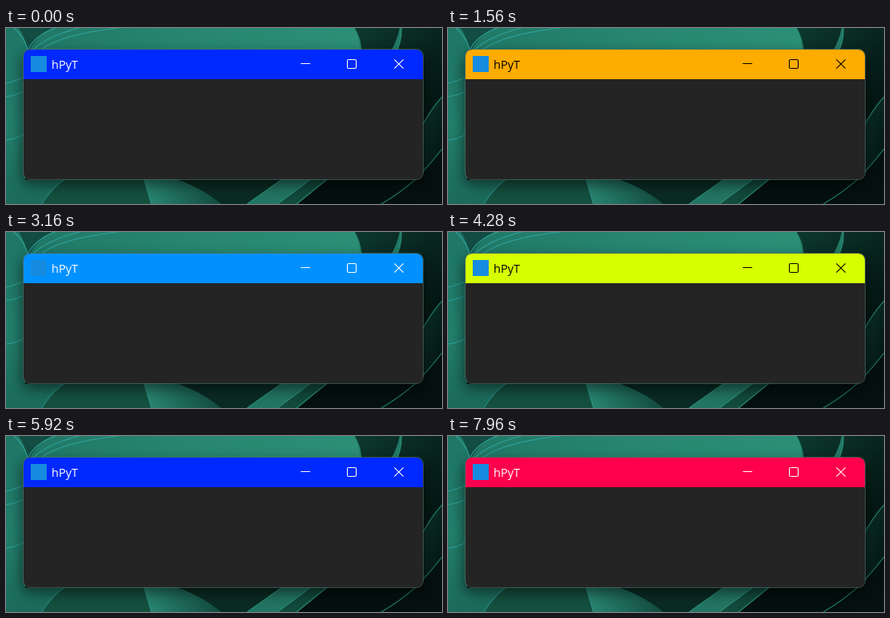
Write an HTML page that moves like this. It is 546 by 220 pixels and loops after 8000 ms.

```html
<!DOCTYPE html>
<html lang="en">
<head>
<meta charset="utf-8">
<title>Rainbow title bar</title>
<style>
  html, body { margin: 0; width: 100%; height: 100%; overflow: hidden; background: #04110f; }
  svg { display: block; width: 546px; height: 220px; }
  text { font: 14.6px "Open Sans", "Noto Sans", sans-serif; }
</style>
</head>
<body>
<svg viewBox="0 0 546 220">
  <defs>
    <linearGradient id="leaf" x2="1" y2="0">
      <stop offset="0" stop-color="#1f7666"/>
      <stop offset=".5" stop-color="#27866f"/>
      <stop offset="1" stop-color="#2b8f76"/>
    </linearGradient>
    <linearGradient id="side" x2="0" y2="1">
      <stop offset="0" stop-color="#1f7868"/>
      <stop offset=".5" stop-color="#23806d"/>
      <stop offset="1" stop-color="#1b6a5a"/>
    </linearGradient>
    <linearGradient id="night" x2="1" y2="1">
      <stop offset="0" stop-color="#0d3a2f"/>
      <stop offset="1" stop-color="#03100d"/>
    </linearGradient>
    <linearGradient id="petal" x2="1" y2="0">
      <stop offset="0" stop-color="#2a8974"/>
      <stop offset="1" stop-color="#12493d"/>
    </linearGradient>
    <filter id="blur" x="-20%" y="-30%" width="140%" height="160%">
      <feGaussianBlur stdDeviation="9"/>
    </filter>
    <clipPath id="frame"><rect x="22" y="27" width="500" height="162" rx="8"/></clipPath>
  </defs>

  <!-- wallpaper: top and right -->
  <rect width="546" height="220" fill="#04110f"/>
  <path d="M430 0H546V90L518 130V40H430Z" fill="url(#night)"/>
  <path d="M0 0H436Q444 12 445 40H0Z" fill="url(#leaf)"/>
  <path d="M16 0H58Q38 10 28 30Q24 12 16 0Z" fill="#124c42"/>
  <path d="M495 0Q496 16 488 32H480Q490 16 493 0Z" fill="#237a66"/>
  <path d="M546 86Q530 104 518 128V186Q532 168 546 151Z" fill="url(#night)"/>

  <!-- wallpaper: left and bottom -->
  <path d="M0 30H24V190H78Q58 198 45 220H0Z" fill="url(#side)"/>
  <path d="M78 186H172L182 220H45Q58 198 78 186Z" fill="#15503f"/>
  <path d="M182 220L172 186H205Q244 198 270 220Z" fill="url(#petal)"/>
  <path d="M205 186H350L302 220H270Q244 198 205 186Z" fill="#0a2b23"/>
  <path d="M350 186H386L340 220H302Z" fill="#237563"/>
  <path d="M386 186H406L364 220H340Z" fill="#124a3c"/>

  <g fill="none" stroke="#2fa09a" stroke-width="1.2">
    <path d="M10 0Q24 12 28 30M28 26Q38 8 62 0M34 27Q52 10 92 0M44 27Q70 8 140 0"/>
    <path d="M0 69Q10 67 24 61M0 86Q12 84 24 79M0 140Q12 139 24 132"/>
    <path d="M45 220Q58 198 78 186M172 186L182 220" opacity=".7"/>
    <path d="M436 0Q444 12 445 30M495 0Q496 16 488 32M350 186L302 220M386 186L340 220M406 186L364 220" stroke="#2a8d75"/>
    <path d="M546 86Q530 104 518 128M546 151Q530 172 512 190Q494 206 470 220" stroke="#217a62"/>
  </g>

  <!-- window -->
  <rect x="20" y="34" width="504" height="162" rx="8" opacity=".55" filter="url(#blur)"/>
  <g clip-path="url(#frame)">
    <rect x="22" y="27" width="500" height="162" fill="#242424"/>
    <rect id="bar" x="22" y="27" width="500" height="37"/>
  </g>
  <rect x="21.5" y="26.5" width="501" height="163" rx="8.5" fill="none" stroke="#56706a" stroke-opacity=".65"/>
  <rect x="31" y="35" width="20" height="20" fill="#168be0"/>
  <g id="ink">
    <text x="57" y="50.5" fill="currentColor">hPyT</text>
    <g fill="none" stroke="currentColor" stroke-width="1.1">
      <path d="M369 44.5H381M486.3 39.3L497.7 50.7M497.7 39.3L486.3 50.7"/>
      <rect x="427.5" y="39.5" width="11" height="11" rx="1.5"/>
    </g>
  </g>
</svg>
<script>
  const LOOP = 8000, STEP = 40, CYCLE = 2960, START_HUE = 230.3;
  const bar = document.getElementById('bar');
  const ink = document.getElementById('ink');

  // Fully saturated colour; each channel is a trapezoid around the hue wheel.
  const channel = (hue, offset) => {
    const k = (offset + hue / 60) % 6;
    return Math.round(255 * (1 - Math.max(0, Math.min(k, 4 - k, 1))));
  };

  function draw(time) {
    const t = Math.floor((time % LOOP) / STEP) * STEP;
    const hue = (((START_HUE - 360 * t / CYCLE) % 360) + 360) % 360;
    const [r, g, b] = [5, 3, 1].map(offset => channel(hue, offset));
    bar.setAttribute('fill', `rgb(${r},${g},${b})`);
    // Dark caption on light colours
    ink.style.color = 2 * r + 5 * g + b > 1024 ? '#000' : '#fff';
  }

  const origin = performance.now();
  function tick() {
    draw(performance.now() - origin);
    requestAnimationFrame(tick);
  }
  tick();
</script>
</body>
</html>
```
